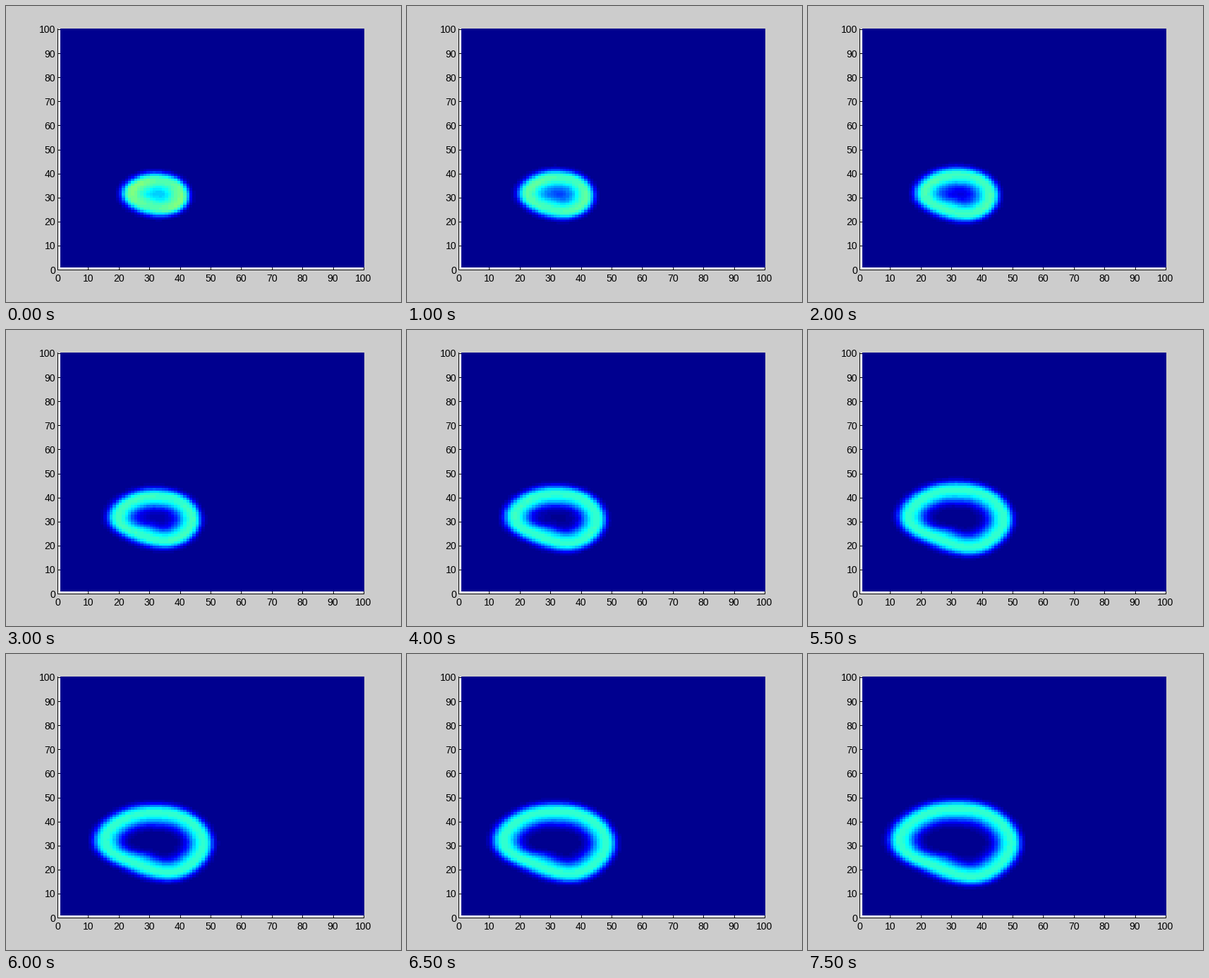
These frames come from a looping animation (560x420 px, 8 s). A matplotlib script:

```python
import numpy as np
import matplotlib.pyplot as plt
from matplotlib.animation import FuncAnimation
from matplotlib.colors import ListedColormap
from matplotlib.patches import Rectangle

W, H, DPI = 560, 420, 100
FRAMES, STEP = 16, 500
LEFT, RIGHT, TOP, BOTTOM = 73, 507, 33, 374
PX = 72 / DPI

# crest radius of the ring every 22.5 degrees, at the start and 7.5 s later
CENTER = (33, 31.6)
R_START = [7.3, 6.9, 6.4, 5.9, 5.8, 6.2, 6.9, 8.1,
           8.9, 8.0, 6.8, 6.2, 6.2, 6.6, 7.2, 7.5]
R_LATE = [16.5, 15.7, 14.8, 14.1, 13.8, 14.6, 16.3, 18.5,
          19.7, 16.6, 13.3, 12.9, 13.9, 15.3, 15.7, 16.2]


def jet64():
    x = np.arange(1, 65) / 64
    bands = [1.5 - np.abs(4 * x - c) for c in (3, 2, 1)]
    return ListedColormap(np.clip(np.stack(bands, axis=1), 0, 1))


def smooth_polar(samples, theta):
    """Periodic trigonometric interpolation of evenly spaced radii."""
    n = len(samples)
    c = np.fft.rfft(samples) / n
    out = np.full(theta.shape, c[0].real)
    for k in range(1, n // 2):
        out += 2 * (c[k] * np.exp(1j * k * theta)).real
    return out


edges = np.arange(1, 101)
edge_x = np.round(73.06 + 4.348 * edges)
edge_y = np.round(374.9 - 3.425 * edges)

x, y = np.meshgrid(edges[:-1] + 0.5, edges[:-1] + 0.5)
dx, dy = x - CENTER[0], y - CENTER[1]
r = np.hypot(dx, dy)
theta = np.arctan2(dy, dx)
r0 = smooth_polar(R_START, theta)
speed = (smooth_polar(R_LATE, theta) - r0) / 7.5
core = np.minimum(r / r0, 1) ** 2
arrival = np.where(r < r0, 2.5 * (core - 1), (r - r0) / speed)
fade = 3.7 + (5.2 / speed - 3.7) * core
lobes = 0.025 * np.cos(2 * theta + 0.7) * core


def field(t):
    crest = 0.414 + (0.055 + lobes) * np.exp(-t / 1.8)
    front = 3.1 + 0.05 * t - 0.33 * np.cos(theta)
    ahead = np.maximum(r - r0 - speed * t, 0) / front
    behind = np.maximum(t - arrival, 0) / fade
    return crest * np.exp(-ahead ** 2.6 - behind ** 2.3)


fig = plt.figure(figsize=(W / DPI, H / DPI), dpi=DPI, facecolor="#cccccc")
ax = fig.add_axes([0, 0, 1, 1])
ax.axis("off")

ax.add_patch(Rectangle((LEFT, TOP - 1), RIGHT + 1 - LEFT, BOTTOM - TOP + 1,
                       fc="white", ec="none", zorder=0))


def line(xs, ys):
    ax.plot(xs, ys, color="black", lw=PX, zorder=1,
            solid_capstyle="butt", snap=False)


line([LEFT + 0.5] * 2, [TOP - 1, BOTTOM + 1])
line([LEFT, RIGHT + 1], [BOTTOM + 0.5] * 2)

label = dict(family="Liberation Sans", size=14 * PX, color="black",
             va="baseline")
for v in range(0, 101, 10):
    px = LEFT + (RIGHT - LEFT) * v / 100
    py = BOTTOM - (BOTTOM - TOP) * v / 100
    line([round(px) + 0.5] * 2, [BOTTOM - 4, BOTTOM + 1])
    line([LEFT, LEFT + 5], [round(py) + 0.5] * 2)
    ax.text(px, 391, str(v), ha="center", **label)
    ax.text(70, py + 5.5, str(v), ha="right", **label)

mesh = ax.pcolormesh(edge_x, edge_y, field(0), cmap=jet64(), vmin=0, vmax=1,
                     shading="flat", antialiased=False, zorder=2)
ax.set_xlim(0, W)
ax.set_ylim(H, 0)


def update(i):
    mesh.set_array(field(i * STEP / 1000))
    return [mesh]


anim = FuncAnimation(fig, update, frames=FRAMES, interval=STEP,
                     repeat=True, repeat_delay=0, blit=False)
plt.show()
```
